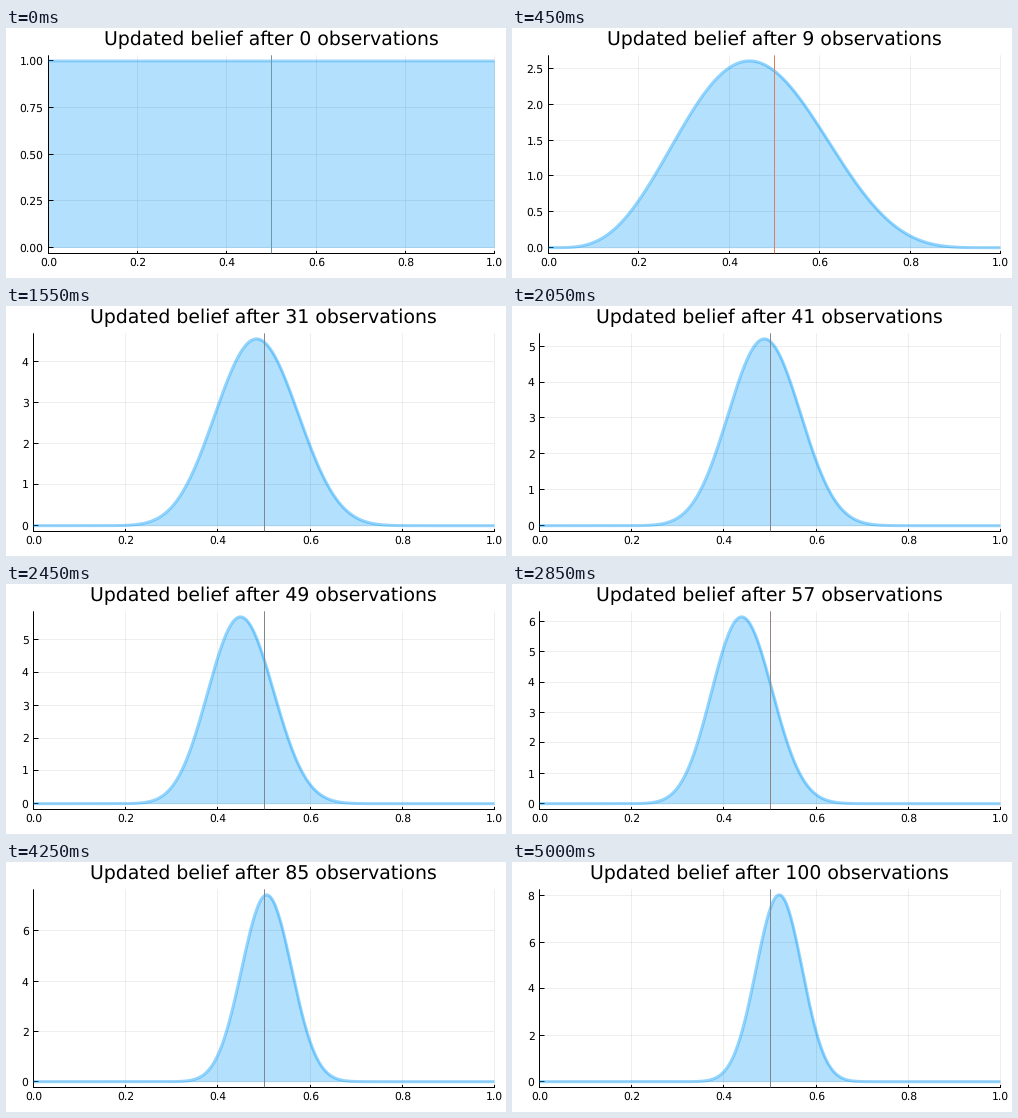
Recreate the animation shown at these times as a matplotlib script. Size 500 by 250 pixels, loop 5.05 s.

```python
import math

import numpy as np
import matplotlib.pyplot as plt
from matplotlib.animation import FuncAnimation

plt.rcParams["font.family"] = "DejaVu Sans"
plt.rcParams["text.hinting"] = "none"

W, H, DPI = 500, 250, 100
PX = 72 / DPI
TOP, BOTTOM, RIGHT = 27.3, 225.3, 488
BLUE = "#009afa"
FLIPS = 100
P_TRUE = 0.5

# Running count of heads at a few flips, evenly spread between them
TRIALS = [0, 1, 2, 4, 5, 9, 22, 41, 57, 71, 100]
HEADS = [0, 1, 1, 3, 3, 4, 10, 20, 25, 35, 52]
heads = np.rint(np.interp(np.arange(FLIPS + 1), TRIALS, HEADS)).astype(int)

theta = np.linspace(0, 1, 401)

fig = plt.figure(figsize=(W / DPI, H / DPI), dpi=DPI, facecolor="white")
ax = fig.add_axes([0, 0, 1, 1])


def posterior(n, k):
    """Density of Beta(k + 1, n - k + 1), the belief from a flat prior."""
    scale = math.exp(math.lgamma(n + 2) - math.lgamma(k + 1) - math.lgamma(n - k + 1))
    return scale * theta**k * (1 - theta) ** (n - k)


def tick_style(limit):
    """Step, number format and left edge of the plot for an upper limit."""
    if limit < 1.1:
        return 0.25, "%.2f", 42
    if limit < 3:
        return 0.5, "%.1f", 36
    return (1 if limit < 7 else 2), "%d", 27


def truth_color(n):
    if n == 0:
        return "#6f97a8"
    if n < 16:
        return "#dc7f5a"
    return "#94837f" if 50 <= n <= 60 else "#80868a"


def crisp(v):
    return math.floor(v) + 0.5


def line(x, y, color="black", width=1.0, **kw):
    ax.plot(x, y, color=color, lw=width * PX, solid_capstyle="butt", snap=False, **kw)


def label(x, y, text, size, align):
    ax.text(x, y, text, fontsize=size * PX, ha=align, va="baseline")


def draw(n):
    ax.clear()
    ax.set_xlim(0, W)
    ax.set_ylim(H, 0)
    ax.axis("off")

    density = posterior(n, heads[n])
    peak = density.max()
    step, fmt, left = tick_style(1.03 * peak)
    span = RIGHT - left

    def to_x(t):
        return left + 0.5 + t * span

    def to_y(v):
        return BOTTOM - (v / peak + 0.03) / 1.06 * (BOTTOM - TOP)

    xticks = [i / 5 for i in range(6)]
    yticks = np.arange(0, 1.03 * peak, step)
    base = crisp(BOTTOM)

    for t in xticks:
        x = crisp(to_x(t))
        line([x, x], [TOP, BOTTOM], alpha=0.065)
    for v in yticks:
        y = crisp(to_y(v))
        line([left, RIGHT], [y, y], alpha=0.065)

    line([left, RIGHT + 1], [base, base])
    line([left + 0.5] * 2, [TOP, base + 0.5])
    for t in xticks:
        x = crisp(to_x(t))
        line([x, x], [base, base - 2.6])
        label(x, 238.3, "%.1f" % t, 10.8, "center")
    for v in yticks:
        y = crisp(to_y(v))
        line([left, left + 5.5], [y, y])
        label(left - 4.4, y + 4, fmt % v, 10.8, "right")

    xs, ys = to_x(theta), to_y(density)
    ax.fill_between(xs, ys, to_y(0), color=BLUE, alpha=0.3, lw=0)
    line(xs, ys, BLUE, 3, alpha=0.3 if n == 0 else 0.42)

    x = crisp(to_x(P_TRUE))
    line([x, x], [TOP, BOTTOM], truth_color(n))

    title = f"Updated belief after {n} observations"
    label((left + RIGHT) / 2, 17.4, title, 18.85, "center")
    return []


anim = FuncAnimation(fig, draw, frames=FLIPS + 1, interval=50,
                     init_func=lambda: draw(0), repeat=True, repeat_delay=0)
plt.show()
```
